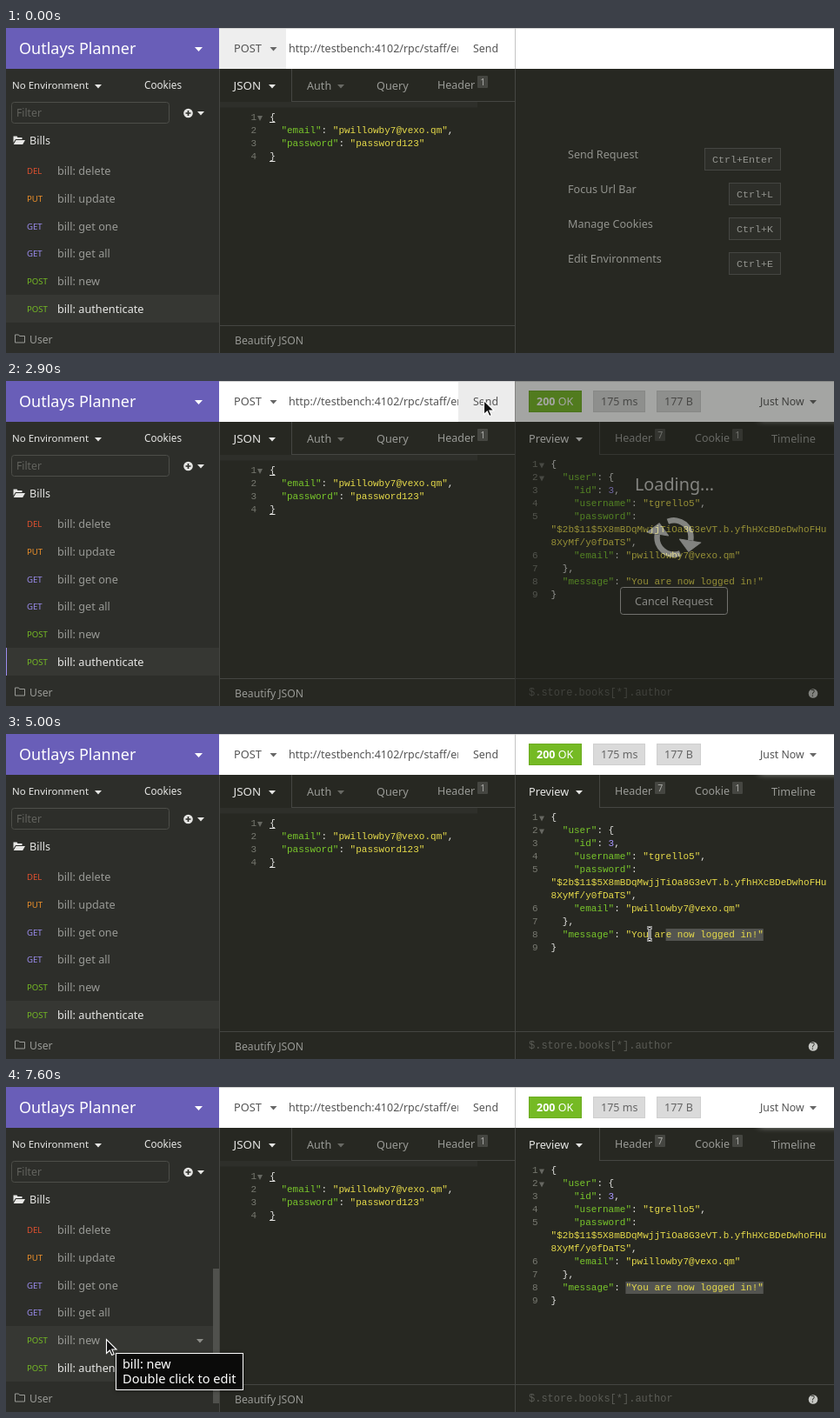
An HTML page that plays this animation: 952 px wide and 374 px high, repeating every 8 s.

```html
<!DOCTYPE html>
<html lang="en">
<head>
<meta charset="utf-8">
<title>API client</title>
<style>
  html, body { margin: 0; width: 100%; height: 100%; overflow: hidden; background: #272822; }
  svg { display: block; }
  text { font: 12.6px "Noto Sans", "Open Sans", sans-serif; white-space: pre; }
  .mono { font-family: "Liberation Mono", "DejaVu Sans Mono", monospace; }
  .glow { filter: blur(4px); }
  #tip { filter: drop-shadow(0 1px 2px rgba(0, 0, 0, .35)); }
</style>
</head>
<body>
<svg id="stage" width="952" height="374" viewBox="0 0 952 374"></svg>
<script>
const LOOP = 8000, STEP = 100, CHAR = 6.6;
const C = {
  pane: '#272822', side: '#2d2e2a', line: '#454642', purple: '#695eb8',
  light: '#e6e6e4', dim: '#999a96', ink: '#555', key: '#79c72b',
  str: '#e7db4a', num: '#a896ff', gutter: '#777870', green: '#75ba24'
};

// Drawing helpers, all returning SVG markup
const rect = (x, y, w, h, fill, extra = '') =>
  `<rect x="${x}" y="${y}" width="${w}" height="${h}" fill="${fill}" ${extra}/>`;
const box = (x, y, w, h, fill, stroke, r = 0) =>
  rect(x + .5, y + .5, w - 1, h - 1, fill, `stroke="${stroke}" rx="${r}"`);
const text = (x, y, s, fill, size = 12.6, extra = '') =>
  `<text x="${x}" y="${y}" fill="${fill}" style="font-size:${size}px" ${extra}>${s}</text>`;
const mono = (x, y, s, fill, size = 11, extra = '') =>
  text(x, y, s, fill, size, `class="mono" ${extra}`);
const caret = (x, y, fill, r = 4) =>
  `<path d="M${x - r} ${y - 2}h${2 * r}l${-r} ${r + .6}z" fill="${fill}"/>`;
const fold = (x, y) => `<path d="M${x - 3} ${y - 2.5}h6l-3 6z" fill="#666761"/>`;
const group = (id, body, extra = '') => `<g id="${id}" ${extra}>${body}</g>`;
const badge = (x, n) =>
  rect(x, 55, 12, 14, '#454641', 'rx="1"') + text(x + 3.2, 66, n, '#aaaba6', 10.5);

// A code line: [line number, indent, [colour, string]...]
function code(x, top, lines) {
  return lines.map(([n, indent, ...parts], i) => {
    const y = top + 15 * i;
    const spans = parts.map(([c, s]) => `<tspan fill="${c}">${s}</tspan>`).join('');
    return mono(x - 15, y, n, C.gutter, 11, 'text-anchor="end"') +
      mono(x + indent * CHAR, y, spans, C.light);
  }).join('');
}
const pair = (k, v, color = C.str, tail = ',') =>
  [[C.key, `"${k}"`], [C.light, ': '], [color, v], [C.light, tail]];
const punct = s => [C.light, s];

const EMAIL = '"pwillowby7@vexo.qm"';
const ROWS = [
  ['DEL', 'delete', '#e2512f'], ['PUT', 'update', '#ec8f2a'],
  ['GET', 'get one', '#9c8df0'], ['GET', 'get all', '#9c8df0'],
  ['POST', 'new', C.green], ['POST', 'authenticate', C.green]
];
const rowTop = i => Math.round(148 + 31.8 * i);

function sidebar() {
  const rows = ROWS.map(([m, name, color], i) => {
    const y = rowTop(i) + 21;
    return text(24, y - 1, m, color, 9.6) +
      text(59, y, 'bill: ' + name, i === 5 ? C.light : C.dim, 12.7);
  }).join('');
  return rect(0, 0, 245, 374, C.side) + rect(0, 0, 245, 47, C.purple) +
    text(15, 30, 'Outlays Planner', '#fff', 18) + caret(221.5, 24, '#fff', 4.5) +
    text(7, 70, 'No Environment', C.light, 11.5) + caret(106, 67, C.light) +
    text(159, 70, 'Cookies', C.light, 11.7) +
    box(6, 85, 182, 25, 'none', '#4d4e49', 3) + text(12, 102, 'Filter', '#62635e', 12.2) +
    `<circle cx="209.5" cy="98" r="5.3" fill="${C.light}"/>
     <path d="M206.5 98h6M209.5 95v6" stroke="${C.side}" stroke-width="1.6"/>` +
    caret(224, 98, C.light) +
    `<path d="M8.5 132v-7.5h4l1 1.5h5v2h-7.5z M11.5 129h10.5l-2.8 5h-10.5z" fill="${C.light}"/>` +
    text(27, 134, 'Bills', C.light) +
    rect(0, 307, 245, 32, '#363733') +
    rect(0, 307, 245, 32, '#363733', 'id="rowHover"') +
    rect(0, 307, 1, 32, '#9c8df0', 'id="focus"') + rows +
    group('rowCaret', caret(223, 0, '#8d8e89')) +
    rect(238, 209, 7, 155, '#50514d', 'id="sideBar"') +
    `<path d="M10.5 362v-9h4l1 1.5h6v7.5z" fill="none" stroke="${C.dim}"/>` +
    text(27, 363, 'User', C.dim, 12.2) + rect(245, 47, 1, 327, C.line);
}

function request() {
  return rect(245, 0, 340, 47, '#fff') +
    rect(245, 1, 77, 46, '#eee', 'id="methodHover"') +
    rect(520, 1, 65, 46, '#eee', 'id="sendHover"') +
    text(262, 28, 'POST', C.ink, 12.8) + caret(307.5, 24, '#666') +
    `<clipPath id="url"><rect x="325" y="0" width="195" height="47"/></clipPath>` +
    text(325, 28, 'http://testbench:4102/rpc/staff/entry', C.ink, 12.5, 'clip-path="url(#url)"') +
    text(537, 28, 'Send', C.ink, 12.4) +
    text(261.5, 71, 'JSON', C.light, 13.4) + caret(306, 67, C.light) +
    text(346, 71, 'Auth', C.dim) + caret(385, 67, '#686964') +
    text(426, 71, 'Query', C.dim, 12.7) + text(496, 70, 'Header', C.dim, 12.5) + badge(542, 1) +
    rect(328, 47, 1, 38, C.line) + rect(328, 84, 257, 1, C.line) +
    rect(246, 85, 296, 6.5, '#2e2f2a', 'id="editBar"') +
    code(303.2, 106, [
      [1, 0, punct('{')],
      [2, 2, ...pair('email', EMAIL)],
      [3, 2, ...pair('password', '"password123"', C.str, '')],
      [4, 0, punct('}')]
    ]) + fold(292, 103.5) + rect(303, 108, 6.5, 1, C.light) + rect(303, 153, 6.5, 1, C.light) +
    rect(246, 342, 339, 1, C.line) + text(263, 364, 'Beautify JSON', C.dim, 12.2);
}

function idle() {
  const keys = [['Send Request', 'Enter'], ['Focus Url Bar', 'L'],
    ['Manage Cookies', 'K'], ['Edit Environments', 'E']];
  return keys.map(([label, k], i) => {
    const y = 138 + 40 * i, left = k.length > 1 ? 803 : 831;
    return text(646, y + 12, label, '#92938e', 12.6) +
      box(left, y, 891 - left, 26, '#2d2e29', '#454642') +
      mono(left + 9, y + 16.5, 'Ctrl+' + k, '#92938e', 11.7);
  }).join('');
}

function response() {
  const tag = (x, w, s, fill, edge, ink) => box(x, 11, w, 25, fill, edge) + text(x + 9, 28, s, ink, 12.5);
  const gray = (x, w, s) => tag(x, w, s, '#dadada', '#cfcfcf', '#666');
  return rect(866, 8, 100, 36, '#fff', 'class="glow"') +
    tag(601, 61, '<tspan font-weight="700">200</tspan> OK', C.green, '#6cab21', '#fff') +
    gray(675, 60, '175 ms') + gray(748, 51, '177 B') +
    text(867, 28, 'Just Now', C.ink, 12.3) + caret(928, 24, '#666') +
    text(601, 71, 'Preview', C.light, 12.7) + caret(659, 67, C.light) +
    text(700, 70, 'Header', C.dim, 12.5) + badge(746, 7) +
    text(792, 70, 'Cookie', C.dim, 12.5) + badge(835, 1) +
    text(880, 71, 'Timeline', C.dim, 12.7) +
    rect(682, 47, 1, 38, C.line) + rect(682, 84, 270, 1, C.line) +
    rect(712, 224, 0, 14, '#535450', 'id="pick"') +
    code(626.6, 99, [
      [1, 0, punct('{')],
      [2, 2, ...pair('user', '{', C.light, '')],
      [3, 4, ...pair('id', '3', C.num)],
      [4, 4, ...pair('username', '"tgrello5"')],
      [5, 4, ...pair('password', '', C.str, '')],
      ['', 0, [C.str, '"$2b$11$5X8mBDqMwjjTiOa8G3eVT.b.yfhHXcBDeDwhoFHu']],
      ['', 0, [C.str, '8XyMf/y0fDaTS"'], punct(',')],
      [6, 4, ...pair('email', EMAIL, C.str, '')],
      [7, 2, punct('},')],
      [8, 2, ...pair('message', '"You are now logged in!"', C.str, '')],
      [9, 0, punct('}')]
    ]) + fold(616, 97) + fold(616, 112) +
    rect(586, 342, 366, 1, C.line) +
    mono(601, 362, '$.store.books[*].author', '#5a5b55', 12) +
    `<circle cx="928" cy="359.5" r="5.3" fill="#c6c7c3"/>` +
    text(925.4, 363.3, '?', C.pane, 10, 'font-weight="700"');
}

function loading() {
  const half = '<path d="M-19 -5A19.5 19.5 0 0 1 14 -13.5" fill="none" stroke="#ddd" stroke-width="6.5"/>' +
    '<path d="M23 -21.5V-4H5.5Z" fill="#ddd" stroke="#ddd" stroke-linejoin="round"/>';
  return rect(585, 0, 367, 374, '#1b1c18', 'opacity=".79"') +
    text(723, 126, 'Loading...', '#e0e0de', 19.8) +
    `<g transform="translate(768 180)">${group('spin', half + `<g transform="rotate(180)">${half}</g>`)}</g>` +
    box(706, 237, 124, 32, '#1e1f1b', '#bcbcba', 3) + text(723, 258, 'Cancel Request', '#e8e8e6', 12.5);
}

const tip = box(126, 306, 147, 43, '#0b0b0a', '#fff') +
  text(134, 324, 'bill: new', '#fff', 14.4) + text(134, 341, 'Double click to edit', '#fff', 14.6);
const arrow = '<path d="M.5 .5V16.5L4.3 13L6.8 18.5L9.2 17.4L6.8 12H12Z" fill="#111" stroke="#fff" stroke-width="1.1"/>';
const beamPath = 'M-3 -7H-1L0 -6L1 -7H3M0 -6V6M-3 7H-1L0 6L1 7H3';
const beam = `<path d="${beamPath}" fill="none" stroke="#fff" stroke-width="3"/>
  <path d="${beamPath}" fill="none" stroke="#111" stroke-width="1"/>`;

document.getElementById('stage').innerHTML =
  rect(0, 0, 952, 374, C.pane) + sidebar() + request() +
  rect(585, 0, 367, 47, '#fff') + group('idle', idle()) + group('response', response()) +
  rect(245, 0, 707, 1, '#d2d2d2') + rect(585, 0, 1, 47, '#c4c4c4') + rect(585, 47, 1, 327, C.line) +
  group('loading', loading()) + group('tip', tip) + group('arrow', arrow) + group('beam', beam);

const el = {};
document.querySelectorAll('[id]').forEach(e => el[e.id] = e);

// Pointer path: time, x, y
const PATH = [
  [1500, 430, 325], [1700, 470, 230], [1900, 540, 80], [2000, 553, 42],
  [2100, 552, 30], [2300, 549, 22], [3100, 549, 22], [3300, 559, 46],
  [3500, 720, 150], [3700, 916, 252], [3800, 905, 258], [3900, 880, 232],
  [4200, 878, 232], [4400, 878, 232], [4500, 872, 231], [4700, 845, 231],
  [4900, 760, 231], [5000, 740, 230], [5100, 722, 229], [5300, 717, 229],
  [5400, 718, 230], [5800, 718, 230], [5900, 722, 280], [6100, 744, 304],
  [6500, 744, 304], [6700, 640, 318], [6900, 340, 326], [7000, 225, 318],
  [7200, 128, 297], [7300, 118, 293], [7400, 118, 293], [7500, 115, 290]
];

function pointer(t) {
  const i = PATH.findIndex(p => p[0] > t);
  if (i < 0) return PATH[PATH.length - 1].slice(1);
  const [t0, x0, y0] = PATH[Math.max(i - 1, 0)], [t1, x1, y1] = PATH[i];
  const k = t1 > t0 ? (t - t0) / (t1 - t0) : 0;
  return [Math.round(x0 + (x1 - x0) * k), Math.round(y0 + (y1 - y0) * k)];
}

const show = (e, on) => e.setAttribute('opacity', +on);
const between = (t, a, b) => t >= a && t < b;
const ramp = (t, a, b) => Math.max(0, Math.min(1, (t - a) / (b - a)));

function render(t) {
  const seen = t >= 1500, [x, y] = pointer(t);
  const overText = y < 342 && (between(x, 246, 585) && y > 92 || x > 586 && y > 85);
  show(el.arrow, seen && !overText);
  show(el.beam, seen && overText);
  el.arrow.setAttribute('transform', `translate(${x} ${y})`);
  el.beam.setAttribute('transform', `translate(${x} ${y})`);

  show(el.methodHover, !seen);
  const overSend = seen && between(x, 520, 585) && y < 47;
  show(el.sendHover, overSend);
  el.sendHover.setAttribute('fill', t < 2200 ? '#f9f9f9' : t < 3200 ? '#ececec' : '#f3f3f1');
  const overEditor = seen && between(x, 246, 585) && y > 44;
  el.editBar.setAttribute('fill', overEditor ? '#4d4e4a' : '#2e2f2a');

  // The reply lands under the overlay, which then fades
  show(el.focus, between(t, 2400, 4500));
  show(el.idle, t < 2700);
  show(el.response, t >= 2700);
  show(el.loading, ramp(t, 2400, 2600) - ramp(t, 2800, 3000));
  el.spin.setAttribute('transform', `rotate(${(t - 2600) * .18})`);

  // The highlight trails the pointer by one step
  const from = t < 4500 ? 24 : Math.max(0, Math.min(24,
    Math.floor((pointer(Math.min(t, 5400) - STEP)[0] - 712.4) / CHAR)));
  el.pick.setAttribute('x', 712.4 + from * CHAR);
  el.pick.setAttribute('width', (24 - from) * CHAR);

  const overSide = seen && x < 245;
  const row = Math.max(0, Math.min(5, Math.floor((y - 148) / 31.8)));
  show(el.sideBar, overSide);
  show(el.rowHover, overSide);
  show(el.rowCaret, overSide);
  el.rowHover.setAttribute('y', rowTop(row));
  el.rowCaret.setAttribute('transform', `translate(0 ${rowTop(row) + 17})`);
  show(el.tip, ramp(t, 7400, 7600));
}

const start = performance.now();
function tick() {
  const t = (performance.now() - start) % LOOP;
  render(Math.floor(t / STEP) * STEP);
  requestAnimationFrame(tick);
}
tick();
</script>
</body>
</html>
```
